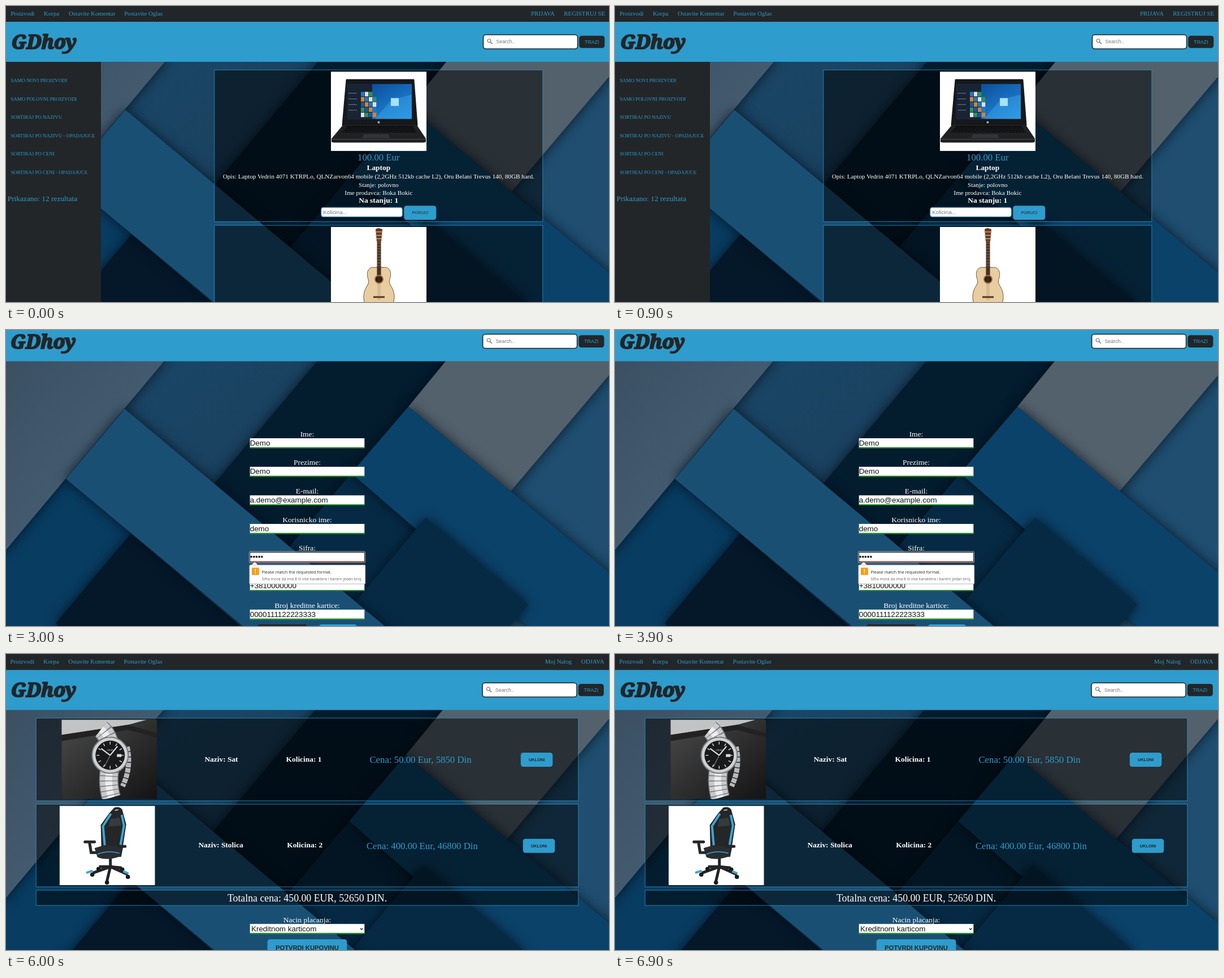
An HTML page for the animation above (7500 ms loop, 1067 by 525 pixels).

```html
<!DOCTYPE html>
<html lang="sr">
<head>
<meta charset="utf-8">
<title>Web prodavnica</title>
<style>
html, body { margin: 0; width: 100%; height: 100%; overflow: hidden; background: #04172a; }
#stage { display: block; width: 100vw; height: 100vh; }
.scene { visibility: hidden; animation: show 7.5s step-end infinite; }
@keyframes show { 0% { visibility: visible; } 20%, 100% { visibility: hidden; } }
text { font-family: "Liberation Serif", "Times New Roman", serif; }
.sans { font-family: "Liberation Sans", Arial, sans-serif; }
.tip { font-family: "Open Sans", sans-serif; }
.bold { font-weight: bold; }
.logo { font: italic 900 34px "Noto Serif", serif; stroke: #222629; stroke-width: 2.2; stroke-linejoin: round; }
.sheet { filter: drop-shadow(0 0 11px rgba(0, 8, 18, .75)); }
</style>
</head>
<body>
<svg id="stage" viewBox="0 0 1067 525" preserveAspectRatio="none"></svg>
<script>
const BLUE = '#2e9ccc', DARK = '#222629', WHITE = '#fff';

const rect = (x, y, w, h, fill, extra = '') =>
  `<rect x="${x}" y="${y}" width="${w}" height="${h}" fill="${fill}" ${extra}/>`;
const poly = (points, fill, extra = '') => `<polygon points="${points}" fill="${fill}" ${extra}/>`;
const line = (d, color, width, extra = '') =>
  `<path d="${d}" fill="none" stroke="${color}" stroke-width="${width}" ${extra}/>`;
const circle = (x, y, r, fill, extra = '') => `<circle cx="${x}" cy="${y}" r="${r}" fill="${fill}" ${extra}/>`;
const text = (x, y, size, fill, str, cls = '', anchor = 'start') =>
  `<text x="${x}" y="${y}" font-size="${size}" fill="${fill}" class="${cls}" text-anchor="${anchor}">${str}</text>`;
const mid = (x, y, size, fill, str, cls) => text(x, y, size, fill, str, cls, 'middle');
const move = (x, y, body) => `<g transform="translate(${x} ${y})">${body}</g>`;
const range = (n, fn) => Array.from({ length: n }, (_, i) => fn(i)).join('');

const panel = (x, y, w, h) =>
  rect(x, y, w, h, '#000', `fill-opacity=".5" stroke="${BLUE}" stroke-opacity=".75" stroke-width="1"`);
const button = (x, y, w, h, size, label, cls = 'sans', fill = BLUE, ink = DARK) =>
  rect(x, y, w, h, fill, 'rx="4.5"') + mid(x + w / 2, y + h / 2 + size * .36, size, ink, label, cls);
const picture = (x, y, h, body, fill = WHITE) =>
  `<svg x="${x}" y="${y}" width="169" height="${h}">${rect(0, 0, 169, h, fill)}${body}</svg>`;

// Overlapping paper sheets, lowest first
const sheets = [
  ['150,255 288.5,90 610,90 500,430', 'url(#mid)'],
  ['559.5,90 790,90 600,330 495,437 370,316', '#031c2e'],
  ['612,298 760,420 600,600 495,437', '#062a44'],
  ['-10,440 110,300 240,420 120,600 -10,600', '#083c61'],
  ['222,405 440,590 110,590 89,564', '#04182a'],
  ['-10,90 288.5,90 -10,447', 'url(#slate)'],
  ['786.5,90 1080,90 1080,110 894,330 713,180', '#53616c'],
  ['713,180 1080,484 1080,600 960,600 612,298', '#0b4269'],
  ['744,377 925,531 867,600 557,600', '#062a44'],
  ['211,184 708,600 457,600 107,308', '#1a4f74']
];
const gradient = (id, from, to) =>
  `<linearGradient id="${id}" x2="1" y2="1"><stop stop-color="${from}"/><stop offset="1" stop-color="${to}"/></linearGradient>`;
const defs = `<defs>
  ${gradient('slate', '#3a4f62', '#4d667b')}${gradient('mid', '#1b4767', '#193d5a')}
  ${gradient('desktop', '#0a3f8c', '#1f8fe0')}${gradient('photo', '#4a4a4a', '#131313')}
  <g id="bg">${rect(-10, 90, 1090, 510, '#1f4e70')}${sheets.map(([p, f]) => poly(p, f, 'class="sheet"')).join('')}</g>
</defs>`;
const backdrop = (transform = '') => `<use href="#bg" transform="${transform}"/>`;
const narrow = y => `translate(0 ${y}) scale(.992)`;

function header({ y = 0, left = 0, right = 0, links = [[929, 'PRIJAVA'], [987.3, 'REGISTRUJ SE']], query }) {
  const menu = [[8.3, 'Proizvodi'], [67, 'Korpa'], [111, 'Ostavite Komentar'], [209.3, 'Postavite Oglas']];
  const item = shift => ([x, label]) => text(x + shift, 17.2, 10.9, BLUE, label);
  return move(0, y,
    rect(0, -9, 1067, 37.3, DARK) + rect(0, 28, 1067, 71, BLUE) +
    menu.map(item(left)).join('') + links.map(item(right)).join('') +
    text(9.5 + left, 76, 34, DARK, 'GDhoy', 'logo') +
    move(right, 0,
      rect(844.5, 51, 167, 25, WHITE, `rx="4.5" stroke="${DARK}" stroke-width="1.6"`) +
      circle(855, 61.5, 3, 'none', 'stroke="#777" stroke-width="1.1"') + line('M857.2 63.8l3.6 3.6', '#777', 1.5) +
      text(867.3, 66.4, 8.9, query ? '#111' : '#777', query || 'Search..', 'sans') +
      button(1014.3, 52.7, 45, 21.8, 8.9, 'TRAZI', 'sans', DARK, BLUE)));
}

function sidebar(y, left, count) {
  const filters = ['SAMO NOVI PROIZVODI', 'SAMO POLOVNI PROIZVODI', 'SORTIRAJ PO NAZIVU',
    'SORTIRAJ PO NAZIVU - OPADAJUCE', 'SORTIRAJ PO CENI', 'SORTIRAJ PO CENI - OPADAJUCE'];
  return move(left, y, rect(0, 99, 168, 436, DARK) +
    filters.map((f, i) => text(8.4, 135 + i * 32.6, 8.9, BLUE, f)).join('') +
    text(2.7, 345.7, 13.4, BLUE, `Prikazano: ${count} rezultata`));
}

const laptop =
  poly('28,15 146,15 152,95 21,95', '#16181b', 'stroke="#16181b" stroke-width="3" stroke-linejoin="round"') +
  rect(28, 22, 115, 62, 'url(#desktop)') + rect(28, 22, 45, 62, '#182334') +
  range(4, i => rect(31, 38 + i * 10, 15, 1, '#71808f')) +
  range(20, i => rect(53 + i % 4 * 7, 36 + (i >> 2) * 9.2, 6.2, 8, ['#2378c8', '#348f58', '#d78331', '#dce5ea', '#155a9f'][i * 3 % 5])) +
  poly('78,84 107,50 143,41 143,84', '#49b6f4', 'opacity=".35"') + rect(106, 47, 14, 14, '#a8e2ff') +
  circle(84.5, 90, 2, '#aaa') +
  poly('21,95 152,95 168,119 168,125 164,126 5,126 1,125 1,119', '#202123') +
  poly('28,97 145,97 152,108 20,108', '#08090a') +
  range(3, i => line(`M${26 - i * 2} ${100 + i * 3}H${147 + i * 2}`, '#37393c', .8, 'stroke-dasharray="5 1"')) +
  poly('58,111 102,111 104,118 56,118', '#323437') + line('M1 120H168', '#55585b', .8);

const slimLaptop =
  poly('67,8 155,10 158,13 130,78 47,55', '#17191c') + poly('71,11 153,14 127,72 51,52', '#071a22') +
  circle(114, 41, 21, 'none', 'stroke="#35aab9" stroke-width="2"') +
  poly('111,23 121,29 116,48 122,62 108,62 106,40', '#14718a') + line('M94 60l38-30', '#80dce2', 1) +
  move(78, 20, '<g transform="rotate(4)">' + text(0, 0, 5.2, WHITE, 'VELMORAN', 'sans bold') + text(4, 6, 4.5, WHITE, '6GB RAM', 'sans bold') + '</g>') +
  range(3, i => rect(73 - i, 38 + i * 5, 12, 2.4, '#347b8b')) +
  poly('47,55 130,78 132,82 99,107 11,79 11,75', '#202225') + poly('45,59 118,79 100,92 24,70', '#0b1116') +
  range(4, i => line(`M${41 - i * 5} ${62 + i * 2.7}l72 19`, '#23506a', 1, 'stroke-dasharray="4 1"')) +
  poly('43,83 65,89 56,95 34,88', '#303236') + rect(97, 98, 8, 3, '#2fa4ae');

const guitar =
  line('M85 26V91', '#3c2418', 7) + range(12, i => line(`M81.5 ${29 + i * 5}h7`, '#aaa07e', .6)) +
  poly('79,4 84,2 91,4 89,26 81,26', '#6b3b1d') + line('M78 9h14M78 15h14M79 21h12', '#c9c2a8', 1.2) +
  `<path d="M78 72C65 70 62 82 66 93C70 103 58 106 58 124C58 145 72 151 85 151S112 145 112 124C112 106 100 103 104 93C108 82 105 70 92 72Z" fill="#e8cda1" stroke="#765033"/>` +
  rect(81.5, 70, 7, 19, '#342018') + circle(85, 93, 7, '#251711', 'stroke="#a66e3a" stroke-width="2"') +
  line('M83 26V130M85 26V130M87 26V130', '#8a765b', .4) + rect(75, 123, 20, 3, '#573620');

const links = d => line(d, '#77797b', 34) + line(d, '#c8cacc', 31, 'stroke-dasharray="7 1.5"') +
  line(d, '#ededed', 12, 'stroke-dasharray="7 1.5"');
const watch =
  poly('0,0 151,0 118,9 0,27', '#c3c3c3') + poly('0,27 118,9 169,24 169,32 118,18 0,38', '#222') +
  links('M70 17Q84 28 86 54') + links('M86 84Q80 110 88 138') +
  line('M116 48Q124 85 108 118', '#b7b9bb', 9, 'stroke-dasharray="8 1.5"') +
  circle(86, 63, 32, '#d0d2d3', 'stroke="#77797b" stroke-width="2"') + circle(86, 63, 26, '#191a1c') +
  range(12, i => line('M86 39v5', '#ddd', 1.4, `transform="rotate(${i * 30} 86 63)"`)) +
  line('M86 63L70 51M86 63L99 47', '#e5e5e5', 2) + line('M86 63L76 83', '#ddd', .7) +
  mid(87, 55, 4, '#ddd', 'ORVEL', 'sans') + rect(98, 61, 8, 5, '#ddd');

const chair =
  line('M90 91V110M90 108L59 119M90 108L121 122M90 108L84 133M90 108L70 108M90 108L110 110', '#222426', 5) +
  [[58, 122], [121, 126], [84, 136], [69, 112], [111, 113]].map(([x, y]) => circle(x, y, 3.8, '#191a1b')).join('') +
  line('M45 64h17M53 65l3 18h16M101 72h15M110 73l-3 15H96', '#242628', 5, 'stroke-linecap="round"') +
  '<path d="M97 3Q107 0 111 7L118 33L112 73Q94 81 74 75L73 34L88 13Z" fill="#242628"/>' +
  line('M91 14L77 36L80 70M110 16L114 35L108 69', '#3ca5d4', 4) + poly('90,23 106,21 109,35 87,37', '#373b3e') +
  line('M98 8l6-1', '#ddd', 1.5) +
  '<path d="M62 75Q86 66 110 76L107 90Q83 98 67 91Z" fill="#2a2d30"/>' + line('M67 86Q85 78 106 84', '#3ca5d4', 1.5) +
  rect(47, 115, 12, 4, '#3ca5d4', 'transform="rotate(-18 53 117)"') + rect(112, 116, 10, 4, '#3ca5d4', 'transform="rotate(22 117 118)"');

function laptopCard(cx, y) {
  return panel(cx - (cx > 658 ? 290.5 : 288.3), 113.4 + y, cx > 658 ? 581 : 576.6, 269) +
    move(cx, y,
      picture(-84.3, 116.3, 141, laptop) +
      mid(0, 274, 16.8, BLUE, '100.00 Eur') + mid(0, 291.2, 13.4, WHITE, 'Laptop', 'bold') +
      mid(0, 306.2, 11.2, WHITE, 'Opis: Laptop Vedrin 4071 KTRPLo, QLNZarvon64 mobile (2,2GHz 512kb cache L2), Oru Belani Trevus 140, 80GB hard.') +
      mid(0, 320.5, 11.2, WHITE, 'Stanje: polovno') + mid(0, 334.6, 11.2, WHITE, 'Ime prodavca: Boka Bokic') +
      mid(0, 349.2, 13.4, WHITE, 'Na stanju: 1', 'bold') +
      rect(-101.5, 357.3, 143.5, 16.6, WHITE, `rx="3.5" stroke="${BLUE}"`) +
      text(-98, 369.4, 9.8, '#777', 'Kolicina...', 'sans') + button(45, 354.3, 57, 25, 7.4, 'PORUCI'));
}

function field(cx, y, label, value = '', underline = '#0a850a') {
  return mid(cx, y - 3.2, 13.5, WHITE, label) + rect(cx - 101.3, y, 202.6, 17.5, WHITE) +
    rect(cx - 101.3, y + 15.9, 202.6, 1.7, underline) + text(cx - 101.3, y + 12.8, 13.4, '#111', value, 'sans');
}

const tooltip =
  poly('434,417 440,411.5 446,417', WHITE) + rect(430.8, 416.8, 205, 33.6, WHITE, 'rx="1.5" stroke="#aaa" stroke-width=".8"') +
  rect(435, 421.5, 12.8, 13, '#f89c17', 'rx="1"') + mid(441.4, 432, 11, WHITE, '!', 'sans bold') +
  text(452.5, 431.5, 7.4, '#222', 'Please match the requested format.', 'tip') +
  text(452.5, 443.8, 6.88, '#666', 'Sifra mora da ima 8 ili vise karaktera i barem jedan broj.', 'tip');

function cartRow(y, image, [name, nameX], [count, countX], [price, priceX], buttonX) {
  return panel(53.2, y, 959.6, 146.6) + image +
    mid(nameX, y + 77, 13.4, WHITE, `Naziv: ${name}`, 'bold') +
    mid(countX, y + 77, 13.4, WHITE, `Kolicina: ${count}`, 'bold') +
    mid(priceX, y + 79.3, 16.8, BLUE, `Cena: ${price}`) +
    button(buttonX, y + 61.3, 56.5, 25, 7.4, 'UKLONI', 'sans bold');
}

const allProducts = backdrop() + laptopCard(659.3, 0) +
  panel(368.8, 389, 581, 150) + picture(575, 391.7, 141, guitar) +
  header({}) + sidebar(0, 0, 12);

const searchResults = backdrop(narrow(1.8)) + laptopCard(656.6, 1) +
  panel(368.3, 390, 576.6, 150) + picture(572.3, 393, 112, slimLaptop) + mid(656.6, 522.2, 16.8, BLUE, '1500.00 Eur') +
  header({ y: 1, left: -.6, right: .6, query: 'laptop' }) + sidebar(1, -.5, 2);

const registration = backdrop('translate(-1 -44)') + header({ y: -43.5, left: -1.5, right: -.9, links: [] }) +
  [['Ime:', 'Demo'], ['Prezime:', 'Demo'], ['E-mail:', 'a.demo@example.com'], ['Korisnicko ime:', 'demo'],
    ['Sifra:', '•••••', '#e00000'], ['Telefon:', '+3810000000'], ['Broj kreditne kartice:', '0000111122223333']]
    .map((f, i) => field(533, 192 + i * 50.65, ...f)).join('') +
  rect(431.5, 393.8, 203, 18, 'none', 'rx="1" stroke="#111" stroke-width="1.2"') +
  rect(430.6, 392.9, 204.8, 19.8, 'none', 'rx="1.5" stroke="#fff" stroke-width=".7"') + tooltip +
  rect(445, 522, 88, 20, DARK, 'rx="4.5"') + rect(554, 522, 67, 20, BLUE, 'rx="4.5"');

const login = backdrop() + header({ y: .6, right: .6 }) +
  field(534.5, 301.3, 'Korisnicko ime:') + field(534.5, 351.8, 'Sifra:') +
  mid(534.2, 399, 13.5, WHITE, 'Zapamti me:') +
  rect(531, 402.6, 7, 7, WHITE, 'rx="1" stroke="#777" stroke-width=".7"') +
  button(451, 418.7, 73.5, 29.8, 11.2, 'Prijavi se') + button(551.4, 418.7, 66.4, 29.8, 11.2, 'Resetuj');

const cart = backdrop(narrow(.8)) +
  header({ y: .3, left: -.7, right: -1.5, links: [[955.3, 'Moj Nalog'], [1019.3, 'ODJAVA']] }) +
  cartRow(113.7, picture(98.3, 116.6, 140.6, watch, 'url(#photo)'), ['Sat', 381], [1, 527], ['50.00 Eur, 5850 Din', 733.5], 910.8) +
  cartRow(266.4, picture(94.7, 269.3, 140.6, chair), ['Stolica', 380], [2, 528.7], ['400.00 Eur, 46800 Din', 736.4], 914.7) +
  panel(53.2, 419, 959.6, 27) + mid(533, 438.7, 17.8, WHITE, 'Totalna cena: 450.00 EUR, 52650 DIN.') +
  field(533, 478.8, 'Nacin placanja:', '') + text(434, 491.8, 13.4, '#111', 'Kreditnom karticom', 'sans') +
  line('M627 486.5l2.2 2.4 2.2-2.4', '#111', 1.2) +
  button(462.6, 506, 140.7, 29.5, 11.2, 'POTVRDI KUPOVINU', 'sans bold');

document.getElementById('stage').innerHTML = defs +
  [allProducts, searchResults, registration, login, cart].map((body, i) =>
    `<g class="scene" style="animation-delay:${i * 1.5 - 7.5}s">${body}</g>`).join('');
</script>
</body>
</html>
```
